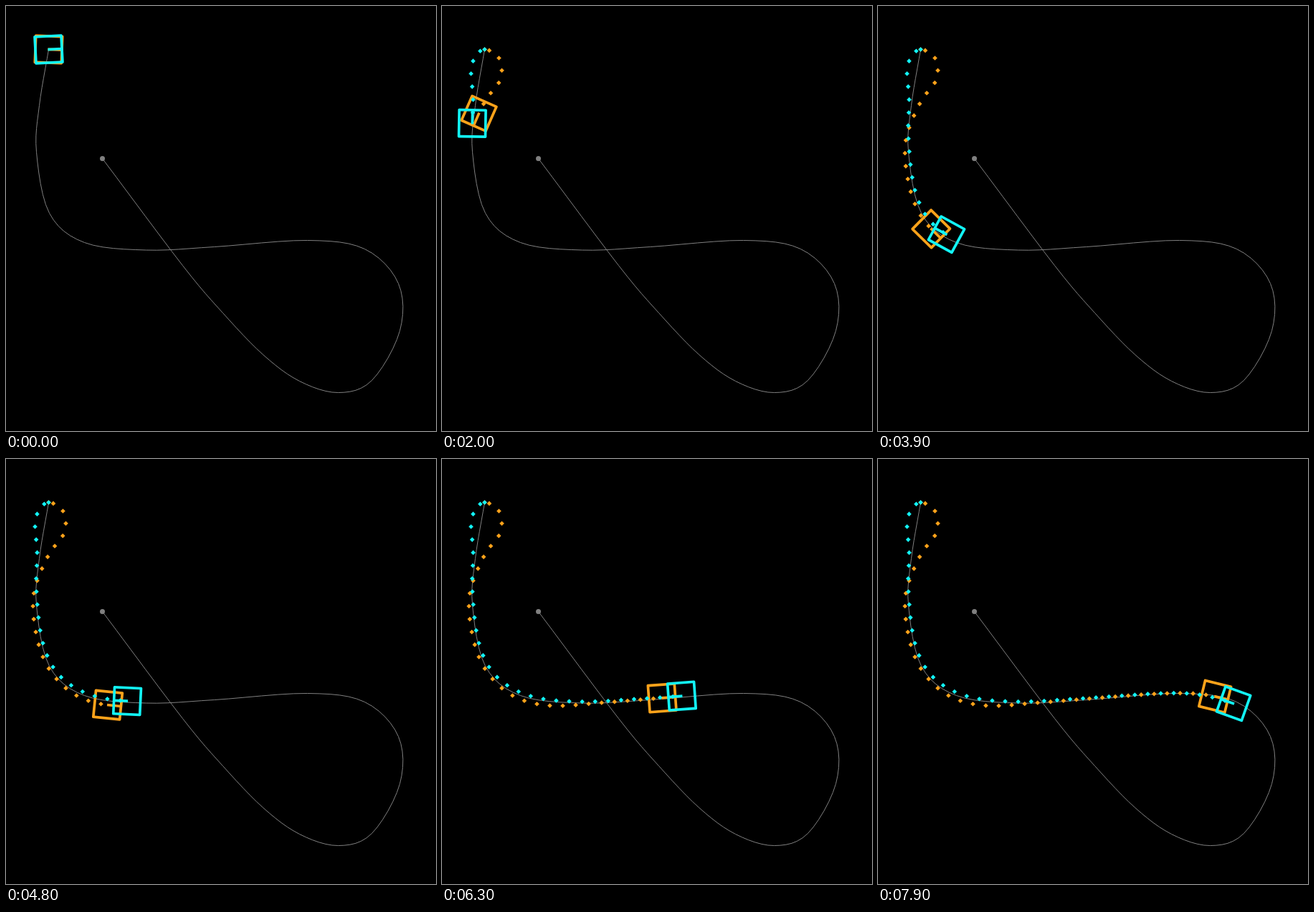
Recreate the animation shown at these times as an HTML page with a canvas. Size 600 by 592 pixels, loop 8000 ms.

```html
<!DOCTYPE html>
<html lang="en">
<head>
<meta charset="utf-8">
<title>Two followers on a path</title>
<style>
html, body { margin: 0; width: 100%; height: 100%; overflow: hidden; background: #000; }
canvas { display: block; }
</style>
</head>
<body>
<canvas id="stage" width="600" height="592"></canvas>
<script>
const ctx = document.getElementById('stage').getContext('2d');
const LOOP = 8000, STEP = 100;
const HALF = 18.5;       // half the side of a robot
const SPACING = 18.12;   // distance between trail marks at full speed
const RAMP = 1.36;       // marks passed while getting up to speed
const CYAN = '#12f4f6', ORANGE = '#ffa31a', GRAY = '#808080';

const pairs = text => text.trim().split(/\s+/).map(p => p.split(',').map(Number));

// Points along a Catmull-Rom curve; lead is the control point before the first.
function curve(keys, lead, detail = 24) {
  const [y, z] = keys.slice(-2);
  const pts = [lead, ...keys, [2 * z[0] - y[0], 2 * z[1] - y[1]]];
  const line = [];
  for (let i = 0; i + 3 < pts.length; i++) {
    const [a, b, c, d] = pts.slice(i, i + 4);
    for (let n = 0; n < detail; n++) {
      const f = n / detail;
      line.push([0, 1].map(k => b[k] + f / 2 * (c[k] - a[k]
        + f * (2 * a[k] - 5 * b[k] + 4 * c[k] - d[k]
        + f * (3 * (b[k] - c[k]) + d[k] - a[k])))));
    }
  }
  return [...line, z];
}

const route = curve(pairs(`59,60 46,138 42,203 60,288 109,329 195,339.5 290,335 420,326
  500,338 547,386 549,452 510,521 463,538 409,522 358,485 302,427 246,361 134,212`), [72, -18], 6);

const robots = [
  { color: ORANGE, turn: 0, track: curve(pairs(`59,60 79,72 83,89 79,106 58,135 38.5,186
      41,240 59,291 97,328.5 150,343 222,339 311,332 402,326 457,328 509,341`), [31, 72]) },
  // This one drives backwards.
  { color: CYAN, turn: Math.PI, track: curve(pairs(`59,60 43,76 40,94 43,130 42,185
      51,256 76,303 124,330 194,337.5 285,333 394,326 449,328 501,342 535,359`), [91, 76]) }
];

// Seconds against progress counted in trail marks.
const pace = pairs('0,0 .2,1.15 1.2,2.65 2.8,11 3.9,16.3 4.4,18.1 6.9,33.33 8,39.24');

function progress(t) {
  const i = pace.findIndex(p => p[0] > t);
  const [t0, u0] = pace[i - 1], [t1, u1] = pace[i];
  return u0 + (u1 - u0) * (t - t0) / (t1 - t0);
}

// Steady acceleration, then constant speed.
const distance = u => SPACING * (u < RAMP ? u * u / (2 * RAMP) : u - RAMP / 2);

function locate(track, dist) {
  for (let i = 1; i < track.length; i++) {
    const [x, y] = track[i - 1];
    const dx = track[i][0] - x, dy = track[i][1] - y, len = Math.hypot(dx, dy);
    if (dist <= len || i === track.length - 1) {
      const f = dist / len;
      return { x: x + dx * f, y: y + dy * f, angle: Math.atan2(dy, dx) };
    }
    dist -= len;
  }
}

function drawRoute() {
  ctx.strokeStyle = ctx.fillStyle = GRAY;
  ctx.lineWidth = 1;
  ctx.beginPath();
  for (const [x, y] of route) ctx.lineTo(x, y);
  ctx.stroke();
  ctx.beginPath();
  ctx.arc(134, 212, 3.5, 0, 2 * Math.PI);
  ctx.fill();
}

function drawTrail({ color, track }, u) {
  const r = 3.3;
  ctx.fillStyle = color;
  for (let k = 0; k < u; k++) {
    const { x, y } = locate(track, distance(k));
    ctx.beginPath();
    ctx.moveTo(x - r, y);
    ctx.lineTo(x, y - r);
    ctx.lineTo(x + r, y);
    ctx.lineTo(x, y + r);
    ctx.fill();
  }
}

function drawRobot({ color, turn, track }, u) {
  const { x, y } = locate(track, distance(u));
  const { angle } = locate(track, distance(u + Math.min(.25, u)));
  ctx.save();
  ctx.translate(x, y);
  ctx.rotate(angle + turn);
  ctx.strokeStyle = color;
  ctx.lineWidth = 3.7;
  ctx.lineJoin = 'round';
  ctx.strokeRect(-HALF, -HALF, 2 * HALF, 2 * HALF);
  ctx.beginPath();
  ctx.moveTo(-1, 0);
  ctx.lineTo(HALF, 0);
  ctx.stroke();
  ctx.restore();
}

function draw(now) {
  const u = progress(Math.floor((now % LOOP) / STEP) * STEP / 1000);
  ctx.setTransform(1, 0, 0, 1, 0, 0);
  ctx.fillStyle = '#000';
  ctx.fillRect(0, 0, 600, 592);
  ctx.translate(.5, .5); // coordinates name pixel centres
  drawRoute();
  for (const robot of robots) {
    drawTrail(robot, u);
    drawRobot(robot, u);
  }
}

const start = performance.now();
function tick() {
  draw(performance.now() - start);
  requestAnimationFrame(tick);
}
tick();
</script>
</body>
</html>
```
